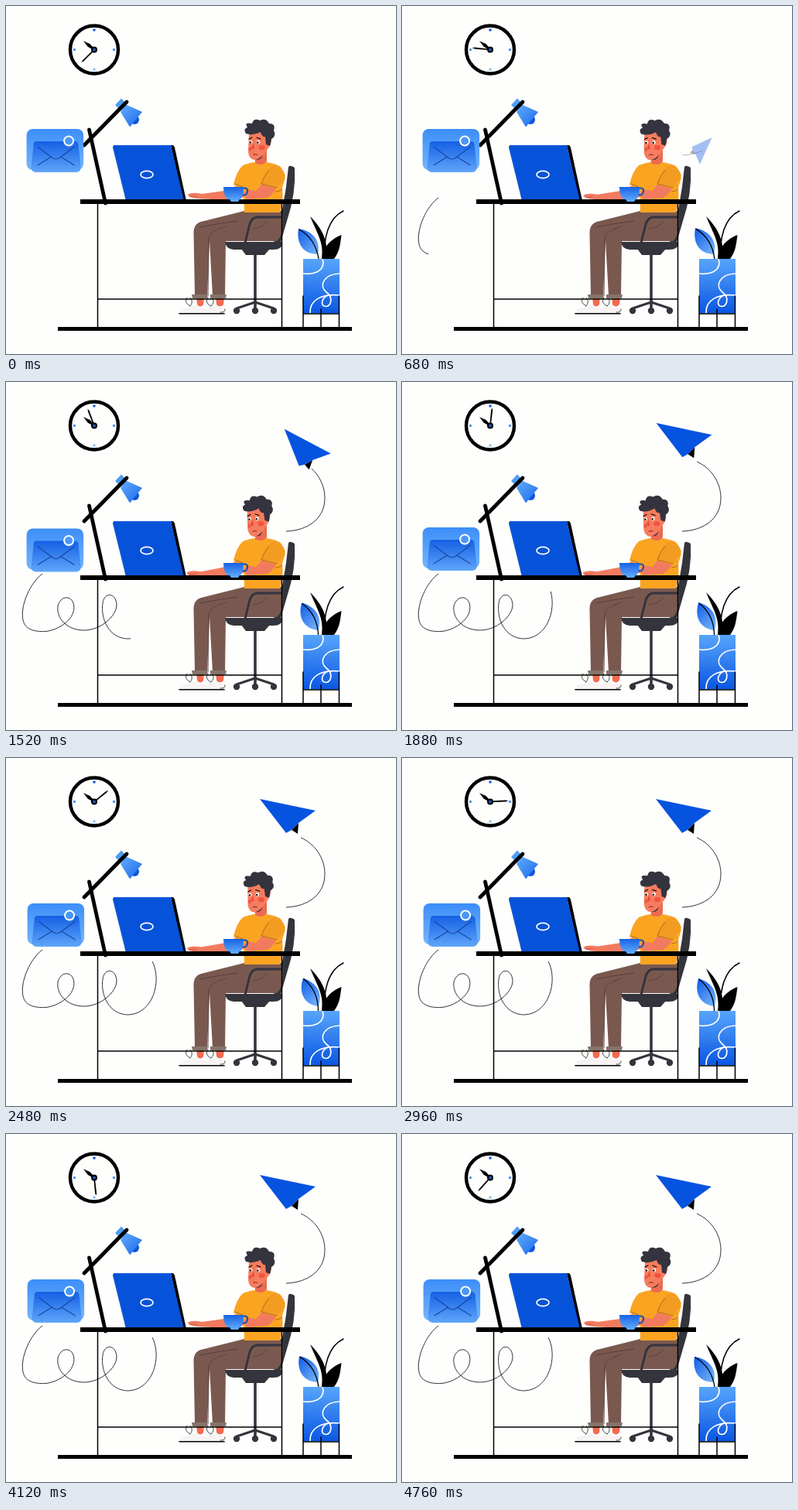
These frames come from a looping animation (504x450 px, 4.8 s). An HTML page:

```html
<!DOCTYPE html>
<html lang="en">
<head>
<meta charset="utf-8">
<title>Sending mail at the desk</title>
<style>
  html, body { margin: 0; width: 100%; height: 100%; overflow: hidden; background: #fefefc; }
  svg { display: block; width: 100%; height: 100%; }
  .line { fill: none; stroke: #000; stroke-linecap: round; stroke-linejoin: round; }
  .trail { fill: none; stroke: #1c1c28; stroke-width: .9; stroke-dasharray: 1 2; }
  .swirl { fill: none; stroke: #fff; stroke-width: 1.7; }
</style>
</head>
<body>
<svg viewBox="0 0 504 450">
  <defs>
    <linearGradient id="pot" x1="0" y1="0" x2="0" y2="1">
      <stop offset="0" stop-color="#58a5fb"/><stop offset="1" stop-color="#0a56e2"/>
    </linearGradient>
    <linearGradient id="leafFill" x1="0" y1="0" x2="1" y2="1">
      <stop offset="0" stop-color="#0f5ce6"/><stop offset="1" stop-color="#7ab8fd"/>
    </linearGradient>
    <linearGradient id="shade" x1="0" y1="0" x2="1" y2="1">
      <stop offset="0" stop-color="#64adfd"/><stop offset="1" stop-color="#1a68ea"/>
    </linearGradient>
    <linearGradient id="box" x1="0" y1="0" x2="0" y2="1">
      <stop offset="0" stop-color="#3d8ef8"/><stop offset="1" stop-color="#74b5fe"/>
    </linearGradient>
    <linearGradient id="letter" x1="0" y1="0" x2="0" y2="1">
      <stop offset="0" stop-color="#1460e4"/><stop offset="1" stop-color="#5ea4fa"/>
    </linearGradient>
    <linearGradient id="cup" x1="0" y1="0" x2="0" y2="1">
      <stop offset="0" stop-color="#1763e2"/><stop offset="1" stop-color="#5ca5fa"/>
    </linearGradient>
  </defs>

  <!-- clock -->
  <circle cx="114" cy="56.500" r="31" fill="#fefefc" stroke="#000" stroke-width="4.400"/>
  <g fill="#4a94f4">
    <circle cx="114" cy="31" r="1.800" fill="#1560e0"/>
    <circle cx="139.500" cy="56.500" r="1.700"/>
    <circle cx="114" cy="82" r="1.700" fill="#84bcfb"/>
    <circle cx="88.500" cy="56.500" r="1.700"/>
  </g>
  <g transform="translate(114 56.500)">
    <path d="M0-18 L2.300-9 1 0H-1L-2.300-9Z" transform="rotate(-51)"/>
    <path id="minute" d="M0-23.500 L1 -20 .8 3H-.8L-1-20Z"/>
    <circle r="4"/><circle r="2" fill="#1b57b8"/>
  </g>

  <!-- lamp -->
  <circle cx="166" cy="147" r="6" fill="#0a55df"/>
  <path d="M141 128 149 119.500 155 126 146 133Z" fill="#4f9cf8"/>
  <path d="M154 127 176 137 160 156.500 148 137Z" fill="url(#shade)"/>
  <path class="line" d="M156 124 101 180M107.500 160 128.500 255" stroke-width="4.800"/>

  <path id="mailTrail" class="trail" pathLength="1" d="M47 248C32 259 18 288 22 308C25 321 38 323 51 322.500C68 321 91 306 87.500 288C85 275 70 276 67 290C65 305 78 321 101 321C122 321 143 303 143 288C142 272 127 271 125 286C122 306 133 332 158 332C190 331 202 288 189 263"/>

  <!-- plant -->
  <g id="leaf">
    <path d="M378 288C375 306 383 321 403 321C407 304 397 291 378 288Z" fill="url(#leafFill)"/>
    <path class="line" d="M379 289Q400 301 404 327" stroke-width="1.300"/>
  </g>
  <path d="M393 272C409 288 418 306 413 327H408C411 306 403 296 393 272Z"/>
  <path d="M433.500 296C417 303 408 314 412 327H424C431 318 432 308 433.500 296Z"/>
  <path class="line" d="M436 265C417 274 410 299 412 327" stroke-width="1.500"/>
  <rect x="384" y="327" width="47" height="70.500" fill="url(#pot)"/>
  <g class="swirl">
    <path d="M384 346C402 348 413 340 409 327"/>
    <path d="M431 346C410 347 404 362 414 370C424 377 420 391 411 388C406 385 409 377 416 374"/>
    <path d="M393 397C392 380 408 372 431 374"/>
  </g>
  <path class="line" d="M384 375V415M430.500 375V415M407 392V415M384 398H430" stroke-width="1.500"/>

  <!-- chair back -->
  <path d="M365 208Q367 205 373 209Q375 242 363 278L354 309 346 306Q360 262 365 208Z" fill="#34343d"/>

  <!-- legs and shoes -->
  <g fill="#f4694f">
    <path d="M246 376H256L255 386Q251 391 247 386Z"/>
    <path d="M271 376H282L281 386Q276 391 272 386Z"/>
  </g>
  <path d="M224 397Q225 391 236 390L245 387 258 391 272 387 283 391V397Z" fill="#f5f3f4"/>
  <path class="line" d="M234 377Q229 383 238 388M238 377Q243 382 238 388M261 377Q256 384 265 388M266 377Q271 383 265 388" stroke-width=".7"/>
  <path class="line" d="M224 397.700H282" stroke-width="1.600"/>
  <path class="line" d="M277 396Q283 397 283 392" stroke-width=".7"/>
  <path d="M308 265H357Q360 296 350 304H284L283 375H267L263 303 260 375H244L242.500 294Q242 280 256 278Z" fill="#79594f"/>
  <path d="M261 375 262 300Q263 291 284 285M250 286Q270 282 300 278M339 278Q331 287 319 288" fill="none" stroke="#573e38" stroke-width=".9"/>
  <path d="M240 373H260L261 378H241ZM264 373H285L284 378H264Z" fill="#85756c"/>

  <!-- chair -->
  <g fill="#34343d">
    <path d="M283 305H357Q358 315 345 315H294Q284 314 283 305Z"/>
    <path d="M304 314H341L334 322H310Z"/>
    <circle cx="298" cy="394" r="4.200"/><circle cx="322" cy="394" r="4.200"/><circle cx="346" cy="394" r="4.200"/>
  </g>
  <g fill="none" stroke="#34343d" stroke-linejoin="round">
    <path d="M309 306 315 282Q318 273 325 273H357" stroke-width="3"/>
    <path d="M322 320V391" stroke-width="3.600"/>
    <path d="M298 391 322 383 346 391" stroke-width="3"/>
  </g>

  <!-- man -->
  <g id="typing">
    <path d="M304 229Q292 236 282 239L253 243Q240 240 235 244Q236 248 247 249L284 251 310 247Z" fill="#f27b5f"/>
    <path d="M237 246 247 246" stroke="#c44f40" stroke-width=".8"/>
  </g>
  <path d="M306 206Q317 202 322 202H337Q350 204 355 208L361 222 357 235Q359 252 354 267H308L307 237 294 231Q298 213 306 206Z" fill="#fba422"/>
  <path d="M321 186H337V201Q331 208 322 203Z" fill="#ec6a50"/>
  <g id="head">
    <path d="M314 163 313 189Q314 198 321 199Q331 199 336 188L341 181Q346 171 339 170L336 160Z" fill="#f67c5e"/>
    <path d="M310 165Q306 159 312 157Q307 150 318 152Q320 144 328 148Q336 144 340 152Q349 152 346 161Q350 168 343 172L341 181 336 179 335 169Q331 170 329 163Q319 168 310 165Z" fill="#34343f"/>
    <g fill="#ee4436">
      <ellipse cx="330.500" cy="183" rx="4" ry="3" opacity=".75"/>
      <ellipse cx="315.500" cy="185" rx="2" ry="2.500" opacity=".7"/>
      <path d="M320 177 317 184 321 185Z"/>
    </g>
    <g fill="#fff"><ellipse cx="316.500" cy="176" rx="2" ry="2.200"/><ellipse cx="326" cy="176" rx="2.300" ry="2.300"/></g>
    <circle cx="316" cy="176.500" r="1.200"/><circle cx="325.300" cy="176.500" r="1.200"/>
    <path class="line" d="M314 172 318 170M324 170 329 172" stroke-width="1.100"/>
    <path d="M319 192.500Q322 191 325 192.500" fill="none" stroke="#7c2c28" stroke-width="1"/>
    <path d="M323 198.500Q329 197 332 192Q330 200 323 198.500Z" fill="#34343f"/>
  </g>
  <path d="M333 228 351 232Q345 245 337 248L312 250 306 243 311 237 323 239Z" fill="#f27b5f"/>
  <path d="M343 207Q356 203 361 219L350 236Q340 235 330 230Q334 216 343 207Z" fill="#f29c22"/>
  <path d="M340 212Q333 220 330 230L350 235M357 237Q354 240 348 240M296 230 306 234" fill="none" stroke="#a96a1e" stroke-width=".9"/>
  <path d="M305 236Q313 234 312 240Q311 246 305 244" fill="none" stroke="#1250b4" stroke-width="2"/>
  <path d="M281 234H307Q307 247 302 251H287Q281 246 281 234Z" fill="url(#cup)"/>

  <!-- laptop and desk -->
  <path d="M213 180H215.500Q217 180 218 183L233 252H229Z"/>
  <path d="M140 180H213L230 252H155L138 183Q138 180 140 180Z" fill="#0653d9"/>
  <ellipse cx="182" cy="218" rx="8" ry="4.700" fill="none" stroke="#fff" stroke-width="1.700"/>
  <path d="M96 250H380V256H96ZM67 415H447V420H67Z"/>
  <path d="M289 250H302L300 253H291Z" fill="#5ca5fa"/>
  <path class="line" d="M118.500 256V415M356.500 256V415M118.500 379H356.500" stroke-width="1.500"/>

  <!-- mail -->
  <g id="mail">
    <rect x="0" y="0" width="73.500" height="53" rx="8" fill="url(#box)"/>
    <rect x="6" y="34" width="64" height="22" rx="6" fill="#66a9fa"/>
    <path d="M13 16H62Q67 16 67 21L70 50Q70 55 65 55H11Q6 55 6 50L9 21Q9 16 13 16Z" fill="url(#letter)"/>
    <path d="M14 23 33 37Q38 41 43 37L62 23M14 47 32 36M62 47 44 36" fill="none" stroke="#1746a0" stroke-width="1.100"/>
    <circle cx="54.500" cy="15.500" r="6" fill="#4b96f6" stroke="#fff" stroke-width="2"/>
  </g>

  <path id="planeTrail" class="trail" pathLength="1" d="M362 193C390 192 412 177 412 150C412 129 399 111 381 103"/>
  <g id="plane">
    <path d="M6 20 15 11 14 25Z"/>
    <path d="M-35-20 37-5 15 11 6 20-1 24Z" fill="#0653e0"/>
  </g>
</svg>
<script>
const LOOP = 4800;
const el = id => document.getElementById(id);
const set = (id, name, value) => el(id).setAttribute(name, value);
const clamp = v => Math.max(0, Math.min(1, v));
const ease = (t, from, to) => (1 - Math.cos(Math.PI * clamp((t - from) / (to - from)))) / 2;
const bezier = (u, a, b, c, d) => {
  const v = 1 - u;
  return v * v * v * a + 3 * v * v * u * b + 3 * v * u * u * c + u * u * u * d;
};

function draw(t) {
  set('minute', 'transform', `rotate(${225 + 360 * t / LOOP})`);

  const sway = (1 - Math.cos(2 * Math.PI * t / LOOP)) / 2;
  set('leaf', 'transform', `rotate(${9 * sway} 402 324)`);

  const lean = ease(t, 0, 1700) - ease(t, 1700, 3600);
  set('head', 'transform', `rotate(${-4 * lean} 334 200)`);
  set('typing', 'transform', `translate(${-2.5 * lean} 0) rotate(${-2.7 * lean} 300 225)`);

  const drop = 38 * ease(t, 680, 1140) - 9 * ease(t, 1140, 1660);
  set('mail', 'transform', `translate(${26.6 + ease(t, 1900, 2400)} ${159 + drop})`);

  const drawn = ease(t, 160, 2040);
  set('mailTrail', 'stroke-dashoffset', 1 - drawn);
  set('mailTrail', 'opacity', drawn > 0 ? 1 : 0);

  const p = ease(t, 160, 1930);
  const shown = clamp(p / 0.55);
  set('planeTrail', 'stroke-dashoffset', 1 - p);
  set('planeTrail', 'opacity', shown);

  const x = bezier(p, 362, 408, 435, 363);
  const y = bezier(p, 193, 198, 104, 73);
  set('plane', 'transform', `translate(${x} ${y}) rotate(${128 * (1 - p)}) scale(${0.4 + 0.6 * p})`);
  set('plane', 'opacity', shown);
}

const start = performance.now();
function tick() {
  draw((performance.now() - start) % LOOP);
  requestAnimationFrame(tick);
}
tick();
</script>
</body>
</html>
```
